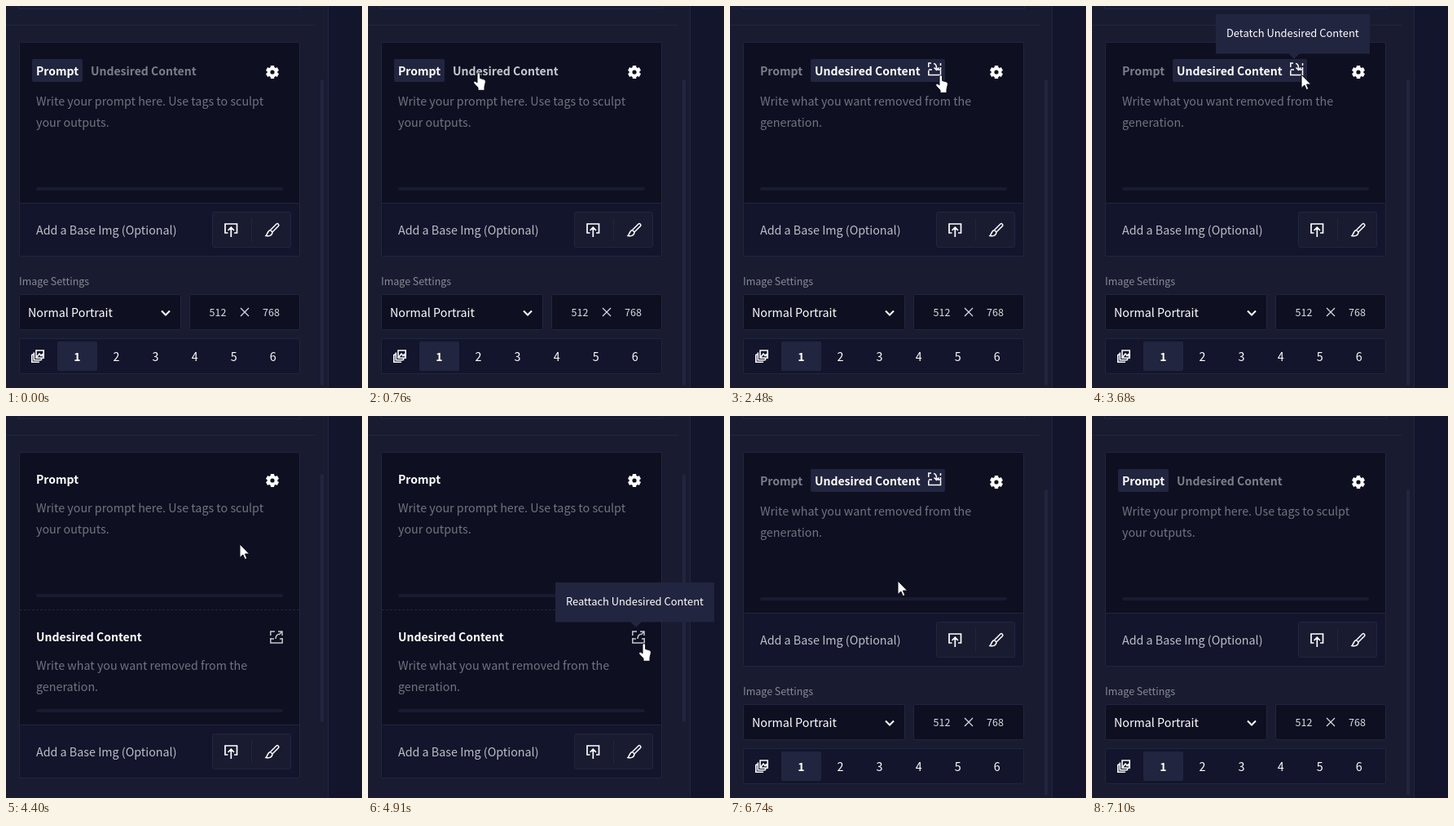
These frames come from a looping animation (437 px wide and 468 px high, 7180 ms). An HTML page:

```html
<!DOCTYPE html>
<html lang="en">
<head>
<meta charset="utf-8">
<title>Prompt panel</title>
<style>
  html, body { margin: 0; width: 100%; height: 100%; overflow: hidden; background: #191b31; }
  svg { display: block; width: 437px; height: 468px; }
  text { font: 14.3px "Noto Sans CJK JP", "Noto Sans CJK SC", "Noto Sans CJK", "Noto Sans", sans-serif; fill: #fff; }
  .head { font-size: 14px; font-weight: 600; }
  .dim { fill: #7d7e88; }
  .hover { fill: #c8c8ce; }
  .hint { fill: #72737e; }
  .soft { fill: #bdbec6; }
  .label { font-size: 12.5px; fill: #888993; }
  .size { font-size: 12.5px; font-weight: 500; fill: #dcdce2; text-anchor: middle; }
  .tip { font-size: 12.9px; }
  .count { text-anchor: middle; }
  .deep { fill: #0e0f21; }
  .mid { fill: #13152c; }
  .base { fill: #191b31; }
  .raised { fill: #22253f; }
  .edge { stroke: #22253f; }
  .icon { fill: none; stroke: #fff; stroke-width: 1.7; }
  .cursor { fill: #fff; stroke: #090a14; stroke-width: 1; stroke-linejoin: round; }
</style>
</head>
<body>
<svg id="stage" viewBox="0 0 437 468"></svg>
<script>
const LOOP = 7180, STEP = 30;

const rect = (x, y, w, h, cls, r = 0) =>
  `<rect x="${x}" y="${y}" width="${w}" height="${h}" rx="${r}" class="${cls}"/>`;
const text = (x, y, str, cls = "", id = "") => `<text x="${x}" y="${y}" class="${cls}" id="${id}">${str}</text>`;
const path = (d, cls = "icon", extra = "") => `<path d="${d}" class="${cls}" ${extra}/>`;
const group = (id, body, x = 0, y = 0) => `<g id="${id}" transform="translate(${x} ${y})">${body}</g>`;

const promptHint = (y) =>
  text(37, y, "Write your prompt here. Use tags to sculpt", "hint") + text(37, y + 26, "your outputs.", "hint");
const removeHint = (y) =>
  text(37, y, "Write what you want removed from the", "hint") + text(37, y + 26, "generation.", "hint");
const bar = (y) => rect(37, y, 303, 4, "base", 2);

const teeth = [0, 60, 120].map(a => `<path d="M0-8V-4M0 4V8" transform="rotate(${a})" stroke-width="4.4"/>`).join("");
const gear = (y) => `<g transform="translate(327 ${y})" class="icon">
  <circle r="4.5" style="stroke-width:3.8"/><g style="stroke-width:4.4">${teeth}</g></g>`;

const detachIcon = group("", path("M.8 10V15.5H15.5V10M.8 6V1H4M.8 9H5M12 9H15.5V6M7 1.5C10 1.5 10.5 4 10.5 8M7.5 6.5L10.5 9.5L13.5 6.5M15.5 1V4", "icon", 'style="stroke-width:1.5"'), 243, 69);
const attachIcon = group("", path("M6 1H.8V6M.8 9V15H15.2V9M.8 10H5M12 10H15.2M7 10C7 6 9 4 13 4M10 1H15V6M15 1L11 5", "icon", 'style="stroke-width:1.5;stroke:#c4c5cc"'), 324, 263);

const tooltip = (id, x, y, w, tipX, str) => `<g id="${id}">
  ${rect(x, y, w, 48.5, "raised")}
  ${path(`M${tipX - 7} ${y + 48}h14l-7 7z`, "raised")}
  ${text(x + 13, y + 28, str, "tip")}</g>`;

const backdrop =
  rect(395, 0, 42, 468, "mid") +
  path("M395.5 0V468M0 23.5H380M15.5 0V3.5H361.5V0", "edge", 'fill="none"');

const attached =
  rect(386, 90, 4, 375, "raised", 2) +
  rect(16.5, 44.5, 344, 262, "deep edge", 2) +
  `<g id="promptTab">${rect(32, 65, 62, 28, "raised", 2)}${promptHint(122)}</g>` +
  `<g id="removeTab">${rect(99, 65, 165, 28, "raised", 2)}${detachIcon}${removeHint(122)}</g>` +
  text(37, 85, "Prompt", "head", "promptHead") +
  text(104, 85, "Undesired Content", "head", "removeHead") +
  gear(81) + bar(222) +
  text(16, 342, "Image Settings", "label") +
  rect(16.5, 353.5, 198, 43, "deep edge", 2) +
  text(27, 381, "Normal Portrait") +
  path("M191 373.5L196 378.5L201 373.5", "icon", 'style="stroke-width:2"') +
  rect(225.5, 353.5, 135, 43, "deep edge", 2) +
  text(260, 380, "512", "size") + text(325.5, 380, "768", "size") +
  path("M288 370L298 380M298 370L288 380", "icon", 'style="stroke-width:1.2;stroke:#dcdce2"') +
  rect(16.5, 407.5, 344, 43, "mid edge", 2) +
  rect(63, 411, 49, 36, "raised", 2) +
  path("M31.8 427V436.2H41M34.3 424.5V433.7H43.5M37 422H46.2V431.2H37ZM38 430L41 426L43 428.5L44.5 427L46 430.5M31.8 427H34M43.5 433.7V431", "icon", 'style="stroke-width:1.6"') +
  [1, 2, 3, 4, 5, 6].map(n => text(39.2 + n * 48.1, 435, n, n === 1 ? "head count" : "count")).join("");

const detached =
  rect(386, 71, 4, 304, "raised", 2) +
  rect(16.5, 44.5, 344, 399, "deep edge", 2) +
  text(37, 83, "Prompt", "head") + gear(79) + promptHint(118) + bar(218) +
  path("M17 237.5H360", "edge", 'stroke-dasharray="3 2"') +
  text(37, 276, "Undesired Content", "head") + attachIcon + removeHint(311) + bar(359);

const strip =
  rect(16.5, 241.5, 344, 65, "mid edge", 2) +
  text(37, 280, "Add a Base Img (Optional)", "soft") +
  rect(253.5, 252.5, 96, 43, "base edge", 2) +
  path("M301.5 260V288", "edge") +
  `<g id="brushHover">${rect(305, 252, 45, 44, "raised", 2)}</g>` +
  path("M272.5 278H269V267H283.5V278H280M276.3 283V271.5M272.5 275L276.3 271.2L280 275") +
  path("M324.5 274.5L332 267C333.5 265.7 335.8 268 334.5 269.5L327 277ZM324.5 274.5C321 275 321.5 279 319 281.5C323 282.5 327 281 327 277", "icon", 'style="stroke-width:1.5"');

const hand = path("M5 2C5 .3 8.6 .3 8.6 2V7.5L13 8.7C15 9.3 15.6 10.5 15.2 13L14 18V22.3H6V19L1.2 14C-.2 12 2 10.3 3.6 11.8L5 13Z", "cursor");
const arrow = path("M0 0V16.5L3.8 13L6.3 18.6L8.8 17.5L6.4 12H11.7Z", "cursor");

const stage = document.getElementById("stage");
stage.innerHTML = backdrop + group("attached", attached) + group("detached", detached) + group("strip", strip) +
  tooltip("detachTip", 152, 10, 189, 248, "Detatch Undesired Content") +
  tooltip("attachTip", 230, 204, 195, 329, "Reattach Undesired Content") +
  `<g id="cursor">${group("hand", hand, -5, 0)}${group("arrow", arrow)}</g>`;

const $ = id => document.getElementById(id);
const show = (id, on) => $(id).style.display = on ? "" : "none";

// start, end, from x, from y, to x, to y
const moves = [
  [400, 940, 0, 80, 181, 81],
  [2210, 2480, 181, 81, 257, 84],
  [4250, 4610, 257, 84, 337, 278],
  [6470, 7100, 337, 278, 3, 84],
];
const ease = p => p * p * (3 - 2 * p);
const stepped = (t, a, b) =>
  Math.min(1, Math.max(0, Math.floor((t - a) / STEP) * STEP / (b - a)));

function pointer(t) {
  const [a, b, x0, y0, x1, y1] = moves.findLast(m => t >= m[0]) || moves[0];
  const p = ease(stepped(t, a, b));
  return [x0 + (x1 - x0) * p, y0 + (y1 - y0) * p];
}

function render(t) {
  const [x, y] = pointer(t);
  const within = (l, top, r, b) => x >= l && x <= r && y >= top && y <= b;
  const split = t >= 3710 && t < 5890;
  const remove = t >= 1490 && t < 7100;
  const onPrompt = !split && within(32, 65, 94, 93);
  const onRemove = !split && within(99, 65, 264, 93);
  const onBrush = !split && within(305, 252, 350, 296);
  const onAttach = split && within(322, 258, 342, 282);
  const pressed = t >= 3680 && t < 3710;
  const pointing = !pressed && (onPrompt || onRemove || onBrush || onAttach);
  const visible = t >= 400 && t < 7100;

  show("attached", !split);
  show("detached", split);
  $("strip").setAttribute("transform", `translate(0 ${split ? 137 : 0})`);
  show("promptTab", !remove);
  show("removeTab", remove);
  const headClass = (active, over) => "head" + (active ? "" : over && visible ? " hover" : " dim");
  $("promptHead").setAttribute("class", headClass(!remove, onPrompt));
  $("removeHead").setAttribute("class", headClass(remove, onRemove));
  show("brushHover", onBrush && visible);

  $("detachTip").style.opacity = t < 3710 ? stepped(t, 2600, 2750) : 0;
  $("attachTip").style.opacity = t < 5890 ? stepped(t, 4760, 4910) : 0;

  show("cursor", visible);
  show("hand", pointing);
  show("arrow", !pointing);
  $("cursor").setAttribute("transform", `translate(${Math.round(x)} ${Math.round(y)})`);
}

const began = performance.now();
function tick() {
  render((performance.now() - began) % LOOP);
  requestAnimationFrame(tick);
}
tick();
</script>
</body>
</html>
```
